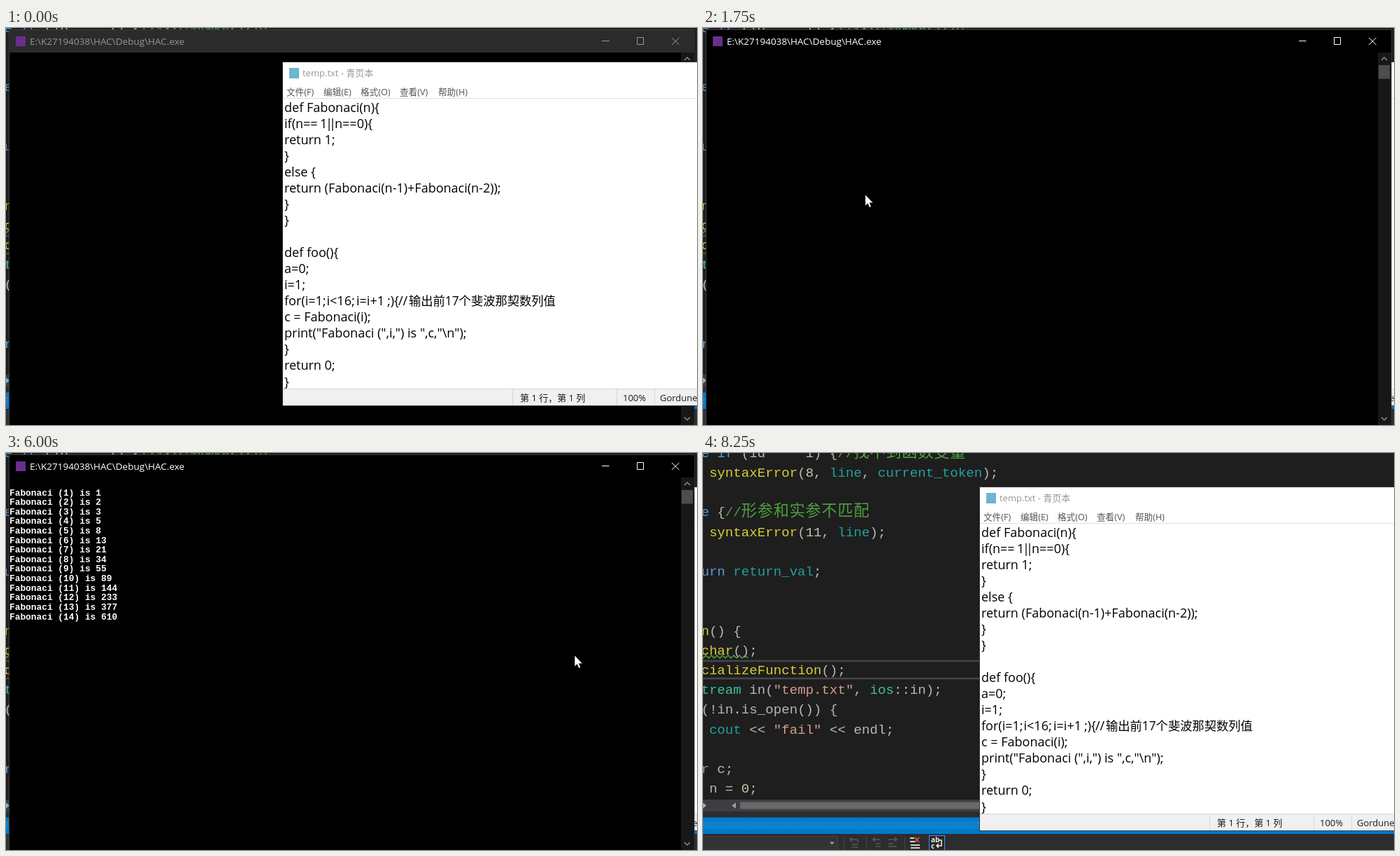
Recreate the animation shown at these times as an HTML page. Size 988 by 567 pixels, loop 8.75 s.

```html
<!DOCTYPE html>
<html lang="zh-CN">
<head>
<meta charset="utf-8">
<title>Console run</title>
<style>
html, body { margin: 0; width: 100%; height: 100%; overflow: hidden; background: #1e1e1e; }
svg { display: block; width: 988px; height: 567px; }
text { white-space: pre; }
.ui { font-family: "Open Sans", "Noto Sans CJK SC", "Noto Sans CJK", sans-serif; font-size: 13px; }
.mono { font-family: "Liberation Mono", "Noto Sans CJK SC", "Noto Sans CJK", monospace; }
.bold { font-weight: 700; fill: #fff; }
.body { font-size: 18px; fill: #000; }
.menu { font-size: 12.6px; fill: #555; }
.caption { font-size: 13.5px; fill: #fff; }
.buttons { stroke: #fff; fill: none; }
.bar { fill: #000; }
.idle .caption { fill: #979797; }
.idle .buttons { stroke: #979797; }
.idle .bar { fill: #2b2b2b; }
.dim { stroke: #58585a; fill: none; stroke-width: 1.5; }
</style>
</head>
<body>
<svg viewBox="0 0 988 567">
  <defs>
    <pattern id="grip" width="4" height="4" y="527" patternUnits="userSpaceOnUse">
      <path d="M0 0h1v1h-1zM2 2h1v1h-1z" fill="#59a8dd"/>
    </pattern>
  </defs>

  <rect width="988" height="567" fill="#1e1e1e"/>
  <g id="editor">
    <path d="M0 297H988M0 322H988" stroke="#464646" stroke-width="2.4"/>
    <g id="code" class="mono"></g>
    <path id="squiggle" fill="none" stroke="#57a64a" stroke-width="1.4"/>
    <rect y="495" width="988" height="17" fill="#3e3e42"/>
    <rect x="53" y="498.5" width="935" height="10" fill="#686868"/>
    <path d="M47 499v9l-6-4.500z" fill="#999"/>
    <path d="M0 499.500l5 4l-5 4z" fill="#75b9ee"/>
    <rect y="512" width="988" height="55" fill="#2d2d30"/>
    <rect y="520.500" width="988" height="23.500" fill="#007acc"/>
    <rect y="527" width="988" height="10" fill="url(#grip)"/>
    <rect x="-2" y="547.500" width="194.500" height="24" fill="#333337" stroke="#434346"/>
    <path d="M181 555.500h7l-3.500 4z" fill="#999"/>
    <path d="M201.500 548V567M233.500 548V567M288.500 548V567" stroke="#464649"/>
    <path class="dim" d="M213 549l-3 3l3 3M210 552h8q4 0 4 4M213 559h9M213 563h9
      M246 549l-3 3l3 3M243 552h10M247 558h7M247 562h7
      M274 549l3 3l-3 3M277 552h-12M265 558h7M265 562h12"/>
    <path d="M296 550h6M296 555h7M297 560h13M297 564h13" stroke="#d0d0d0" stroke-width="1.800"/>
    <path d="M303 549l6 7M309 549l-6 7" stroke="#e0533d" stroke-width="1.800"/>
    <rect x="323.500" y="546.500" width="22" height="24" fill="#252526" stroke="#3399ff"/>
    <g class="ui" fill="#eee" font-weight="700">
      <text x="326" y="556" style="font-size:10px">ab</text>
      <text x="326" y="565" style="font-size:10px">c</text>
    </g>
    <path d="M337 553h4v8h-7M337 558l-3 3l3 3" fill="none" stroke="#eee" stroke-width="1.500"/>
  </g>

  <g id="pad">
    <rect x="395" y="48" width="600" height="492" fill="#fff"/>
    <rect x="405" y="57" width="14" height="15" fill="#6fb4d2"/>
    <text class="ui" x="424" y="69" fill="#979797">temp.txt - 青页本</text>
    <g id="menu" class="ui"></g>
    <path d="M395 100.500H988" stroke="#dedede"/>
    <g id="body" class="ui"></g>
    <rect x="395" y="515" width="600" height="25" fill="#f0f0f0"/>
    <path d="M395 515.500H988M724.500 516V540M873.500 516V540M927.500 516V540" stroke="#d7d7d7"/>
    <g class="ui" fill="#1a1a1a">
      <text x="735" y="532.500">第 1 行，第 1 列</text>
      <text x="882" y="532.500">100%</text>
      <text x="935" y="532.500">Gordune (CRLF)</text>
    </g>
    <rect x="395.500" y="48.500" width="600" height="491" fill="none" stroke="#3c3c3c"/>
  </g>

  <g id="console" class="idle">
    <rect x="4.500" y="2.500" width="979.500" height="570" fill="#000" stroke="#3a3a3a"/>
    <rect class="bar" x="5" y="3" width="979" height="32"/>
    <rect x="14" y="12" width="14" height="14" fill="#68308c"/>
    <text id="caption" class="ui caption" x="34" y="24"></text>
    <path class="buttons" d="M852 18.500h10.500M902.500 13.500h9v10h-9zM952 14l10.500 10M962.500 14l-10.500 10"/>
    <rect x="965" y="35" width="19" height="532" fill="#171717"/>
    <rect x="966" y="53" width="16" height="19.500" fill="#4d4d4d"/>
    <path d="M970 46l4-4l4 4M970 556l4 4l4-4" fill="none" stroke="#8c8c8c" stroke-width="1.500"/>
    <g id="log" class="mono bold"></g>
    <rect id="caret" x="5" width="8" height="4" fill="#fff"/>
  </g>

  <use id="front" href="#pad"/>
  <path id="arrow" d="M0 0V16L3.600 12.700L6 18.300L8.500 17.200L6.200 11.700H11.200Z" fill="#fff" stroke="#000" stroke-width=".5"/>
  <path id="beam" d="M-5 -9h4l1 1l1-1h4M0 -8V8M-5 9h4l1-1l1 1h4" fill="none" stroke="#dcdcdc"/>
</svg>
<script>
const $ = id => document.getElementById(id);
const LOOP = 8750;

function put(parent, x, y, str, attrs = {}) {
  const el = document.createElementNS('http://www.w3.org/2000/svg', 'text');
  el.textContent = str;
  for (const [k, v] of Object.entries({ x, y, ...attrs })) el.setAttribute(k, v);
  parent.appendChild(el);
  return el;
}

// Sets text on a character grid where CJK takes two cells; returns the end x.
function grid(parent, x, y, str, pitch, cjk, attrs) {
  for (const run of str.match(/[\x00-\x7f]+|[^\x00-\x7f]+/g)) {
    const wide = run.charCodeAt(0) > 127;
    const size = wide ? cjk : pitch / 0.6;
    const el = put(parent, x, y, run, { ...attrs, 'font-size': size });
    if (wide) el.setAttribute('letter-spacing', 2 * pitch - cjk);
    x += run.length * pitch * (wide ? 2 : 1);
  }
  return x;
}

// Editor: each row is [line, colour, text, colour, text, ...]
const ink = { y: '#d6cf35', g: '#b8b8b8', t: '#23a09c', b: '#569cd6', c: '#4f9f3f', n: '#b5cea8', s: '#d69d85', k: '#43bd9b' };
const rows = [
  [0, 'b', 'e if', 'g', ' (id     1) {', 'c', '//找不到函数变量'],
  [1, 'y', ' syntaxError', 'g', '(', 'n', '8', 'g', ', ', 't', 'line', 'g', ', ', 't', 'current_token', 'g', ');'],
  [3, 'b', 'e', 'g', ' {', 'c', '//形参和实参不匹配'],
  [4, 'y', ' syntaxError', 'g', '(', 'n', '11', 'g', ', ', 't', 'line', 'g', ');'],
  [6, 'b', 'urn', 't', ' return_val', 'g', ';'],
  [9, 'y', 'n', 'g', '() {'],
  [10, 'y', 'char', 'g', '();'],
  [11, 'y', 'cializeFunction', 'g', '();'],
  [12, 'k', 'tream', 'g', ' in(', 's', '"temp.txt"', 'g', ', ', 'k', 'ios', 'g', '::in);'],
  [13, 'g', '(!in.is_open()) {'],
  [14, 't', ' cout', 'g', ' << ', 's', '"fail"', 'g', ' << endl;'],
  [16, 'b', 'r', 'g', ' c;'],
  [17, 'g', ' n = ', 'n', '0', 'g', ';']
];
for (const [line, ...parts] of rows) {
  let x = -2.6;
  for (let i = 0; i < parts.length; i += 2)
    x = grid($('code'), x, 5.8 + 28.2 * line, parts[i + 1], 11.48, 22.2, { fill: ink[parts[i]] });
}
let wave = 'M0 293';
for (let x = 4, up = true; x <= 66; x += 4, up = !up) wave += `L${x} ${up ? 289 : 293}`;
$('squiggle').setAttribute('d', wave);

// Text window
[[401, '文件(F)'], [454, '编辑(E)'], [507, '格式(O)'], [563, '查看(V)'], [618, '帮助(H)']]
  .forEach(([x, s]) => put($('menu'), x, 95.5, s, { class: 'menu' }));
const script = String.raw`def Fabonaci(n){
if(n==
return 1;
}
else {
return (Fabonaci(n-1)+Fabonaci(n-2));
}
}

def foo(){
a=0;
i=1;
for(i=1;
c = Fabonaci(i);
print("Fabonaci (",i,") is ",c,"\n");
}
return 0;
}`.split('\n');
const type = (row, x, s, attrs) => put($('body'), x, 119.5 + 23.06 * row, s, { class: 'body', ...attrs });
script.forEach((s, i) => type(i, 398, s));
[[449, '1'], [457, '|'], [462, '|'], [470, 'n==0){']].forEach(([x, s]) => type(1, x, s));
[[458.5, 'i<16;'], [501, 'i=i+1'], [545, ';){'], [561, '//']].forEach(([x, s]) => type(12, x, s));
type(12, 576, '输出前17个斐波那契数列值', { style: 'font-size:17.3px' });

// Console output
const path = 'E:\\K27194038\\HAC\\Debug\\HAC.exe';
const out = [];
for (let n = 1, a = 1, b = 2; n <= 15; n++, [a, b] = [b, a + b]) out.push(`Fabonaci (${n}) is ${a}`);
out.push('', path + ' (进程 9484)已退出，返回代码为: 0。', '按任意键关闭此窗口...');
const PITCH = 13.62;
const lines = out.map((s, i) => {
  const g = document.createElementNS('http://www.w3.org/2000/svg', 'g');
  $('log').appendChild(g);
  if (s) grid(g, 5, 60.5 + PITCH * i, s, 7.71, 14);
  return g;
});

// [ms, printed lines, caret on]
const prints = [
  [0, -1, 0], [2500, -1, 1], [2750, 7, 1], [3000, 10, 1], [3250, 11, 0], [3750, 12, 1], [4250, 13, 1],
  [5000, 13, 0], [5250, 14, 1], [6000, 14, 0], [6500, 14, 1], [7000, 18, 1]
];
// [ms, pointer, x, y]
const moves = [
  [0], [750, 'arrow', 555, 558], [1000, 'arrow', 382, 437], [1250, 'arrow', 273, 352], [1500, 'arrow', 232, 238],
  [3250, 'arrow', 522, 112], [3500], [5250, 'arrow', 790, 253], [5500], [6000, 'arrow', 813, 289],
  [6250, 'arrow', 823, 310], [7750, 'beam', 834, 321], [8000, 'beam', 737, 431], [8250]
];
const at = (list, t) => list.filter(e => e[0] <= t).pop();
const show = (el, on) => { el.style.display = on ? '' : 'none'; };

function draw(t) {
  const active = t >= 1750;
  const open = t < 7750;
  show($('console'), open);
  show($('front'), !active || !open);
  $('console').setAttribute('class', active ? '' : 'idle');
  $('caption').textContent = t < 7000 ? path : 'Norvantis Code Studio 调试控制台';

  const [, count, caret] = at(prints, t);
  lines.forEach((g, i) => show(g, i < count));
  show($('caret'), caret);
  $('caret').setAttribute('y', 236 + PITCH * (count - 13));

  const [, kind, x, y] = at(moves, t);
  for (const id of ['arrow', 'beam']) {
    show($(id), id === kind);
    if (id === kind) $(id).setAttribute('transform', `translate(${x} ${y})`);
  }
}

const start = performance.now();
function tick() {
  draw((performance.now() - start) % LOOP);
  requestAnimationFrame(tick);
}
tick();
</script>
</body>
</html>
```
